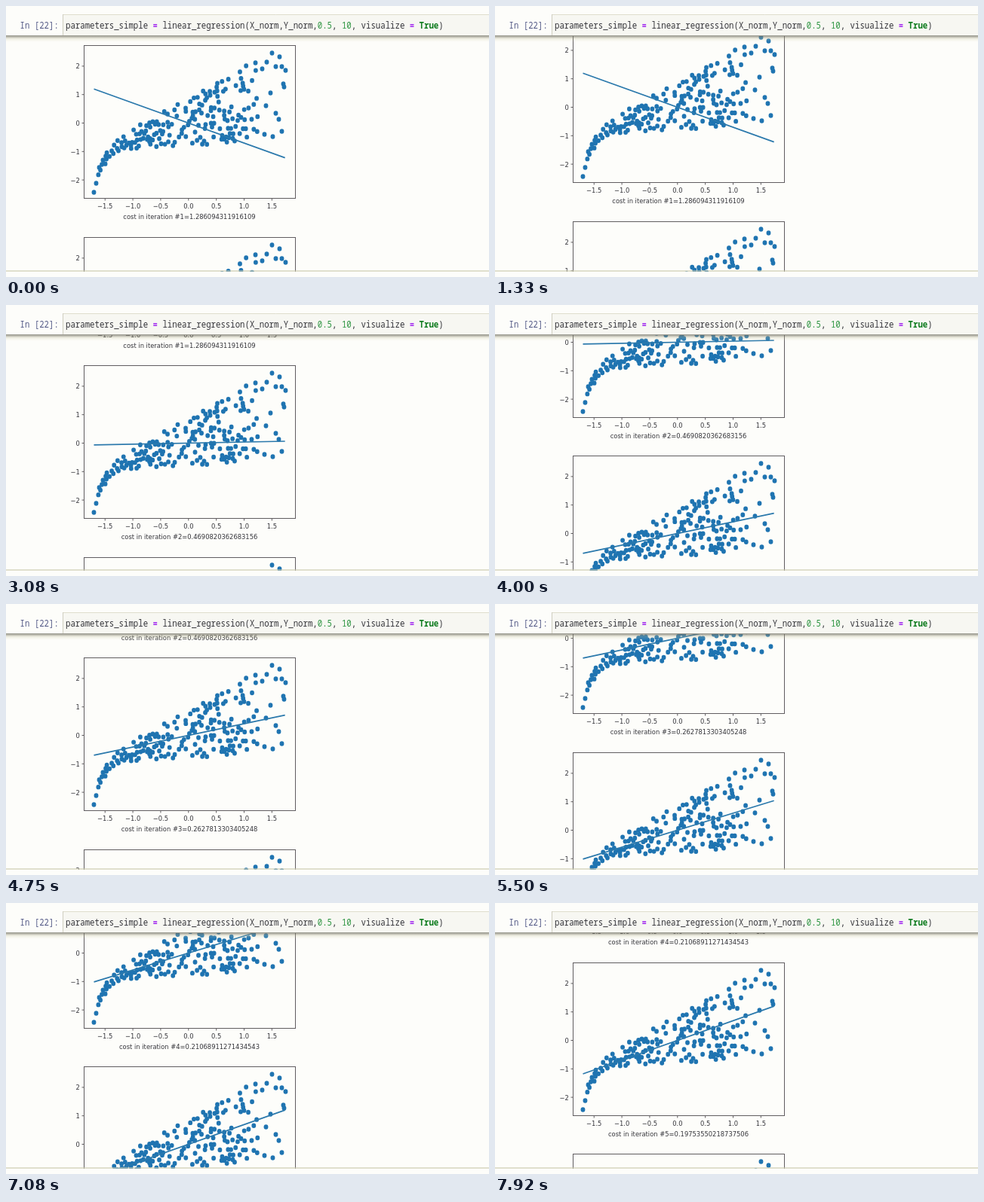
These frames come from a looping animation (640 px wide and 360 px high, 8000 ms). An HTML page with a canvas:

```html
<!DOCTYPE html>
<html lang="en">
<head>
<meta charset="utf-8">
<title>Linear regression notebook</title>
<style>
  html, body { margin: 0; width: 100%; height: 100%; overflow: hidden; background: #fdfdfa; }
  canvas { display: block; width: 640px; height: 360px; }
</style>
</head>
<body>
<canvas id="stage" width="640" height="360"></canvas>
<script>
const ctx = document.getElementById('stage').getContext('2d');
const LOOP = 8000, FRAMES = 96;
const PAPER = '#fdfdfa', INK = '#34343a', AXIS = '#605d60', BLUE = '#1f74b1';

const ASPECT_X = 0.836, ASPECT_Y = 0.934;

// Plot geometry, relative to the top left corner of the axes
const LEFT = 103.5, WIDTH = 280, HEIGHT = 203, PITCH = 254.5, FIRST_TOP = 52.5;
const ORIGIN = { x: 138.3, y: 103 }, UNIT = { x: 73.7, y: 37.8 };

const COSTS = ['1.286094311916109', '0.4690820362683156', '0.2627813303405248',
  '0.21068911271434543', '0.19753550218737506', '0.19421413056127482'];

// Time in ms and scroll offset in px
const SCROLL = [[1150, 0], [2083, 105], [3083, 226], [4000, 361],
  [5500, 619], [6333, 727.5], [7917, 991.5]];

// The sparse ends of the cloud; the rest is scattered between two curves
const END_POINTS = [
  [13, 195], [16, 183], [249, 10], [259, 15], [254, 28], [262, 28], [242, 22], [236, 31],
  [267, 33], [264, 51], [265, 55], [247, 63], [241, 80], [254, 90], [258, 98], [262, 114],
  [250, 121], [239, 118]
];
const SCATTERED = 180, MIN_GAP = 3.5;
const upperEdge = x => 146 - 0.56 * x + 40 * Math.exp((13 - x) / 15);
const lowerEdge = x => 141 - 0.06 * x + 55 * Math.exp((13 - x) / 14);

function randomSource(seed) {
  return () => (seed = (seed * 16807) % 2147483647) / 2147483647;
}

function makePoints() {
  const random = randomSource(4217);
  const points = [...END_POINTS];
  while (points.length < END_POINTS.length + SCATTERED) {
    const x = 18 + 214 * random() ** 1.2;
    const y = upperEdge(x) + (lowerEdge(x) - upperEdge(x)) * random();
    if (points.every(([px, py]) => Math.hypot(px - x, py - y) > MIN_GAP)) points.push([x, y]);
  }
  return points;
}
const POINTS = makePoints();

function scrollAt(time) {
  let i = 1;
  while (i < SCROLL.length - 1 && time > SCROLL[i][0]) i++;
  const [t0, s0] = SCROLL[i - 1], [t1, s1] = SCROLL[i];
  return Math.max(0, s0 + (s1 - s0) * (time - t0) / (t1 - t0));
}

// Draws text in the recording's aspect and returns its width on the stage
function label(text, x, y, font, align = 'left', color = INK) {
  ctx.save();
  ctx.translate(x, y);
  ctx.scale(ASPECT_X, ASPECT_Y);
  ctx.font = font;
  ctx.textAlign = align;
  ctx.fillStyle = color;
  ctx.fillText(text, 0, 0);
  const width = ctx.measureText(text).width * ASPECT_X;
  ctx.restore();
  return width;
}

function line(x0, y0, x1, y1, color, width = 1) {
  ctx.strokeStyle = color;
  ctx.lineWidth = width;
  ctx.beginPath();
  ctx.moveTo(x0, y0);
  ctx.lineTo(x1, y1);
  ctx.stroke();
}

function drawPlot(index, top) {
  const font = '10px "DejaVu Sans", sans-serif';
  const number = value => String(value).replace('-', '\u2212');
  ctx.save();
  ctx.translate(LEFT, Math.floor(top) + 0.5);

  ctx.fillStyle = BLUE;
  for (const [x, y] of POINTS) {
    ctx.beginPath();
    ctx.ellipse(x, y, 2.9, 3.2, 0, 0, 2 * Math.PI);
    ctx.fill();
  }

  // Each gradient step about halves the distance to the best slope
  const slope = 0.787 - 1.49 * 0.5025 ** index;
  const at = x => [ORIGIN.x + x * UNIT.x, ORIGIN.y - slope * x * UNIT.y];
  line(...at(-1.7), ...at(1.735), '#2b79ac', 1.7);

  ctx.strokeStyle = AXIS;
  ctx.lineWidth = 1;
  ctx.strokeRect(0, 0, WIDTH, HEIGHT);
  for (let v = -1.5; v <= 1.5; v += 0.5) {
    const x = ORIGIN.x + v * UNIT.x;
    line(x, HEIGHT, x, HEIGHT + 3, AXIS);
    label(number(v.toFixed(1)), x, 216.5, font, 'center');
  }
  for (let v = -2; v <= 2; v++) {
    const y = ORIGIN.y - v * UNIT.y;
    line(-3, y, 0, y, AXIS);
    label(number(v), -5.7, y + 3.5, font, 'right');
  }
  label(`cost in iteration #${index + 1}=${COSTS[index]}`, WIDTH / 2 - 0.5, 230, font, 'center');
  ctx.restore();
}

function drawHeader() {
  ctx.fillStyle = PAPER;
  ctx.fillRect(0, 0, 640, 40);
  ctx.fillStyle = '#f7f7f2';
  ctx.fillRect(75, 11, 565, 28);
  line(75, 11.5, 640, 11.5, '#deddcd');
  line(75.5, 11, 75.5, 39, '#cfcec0');

  const shadow = ctx.createLinearGradient(0, 39, 0, 48);
  shadow.addColorStop(0, 'rgba(100, 99, 88, 0.7)');
  shadow.addColorStop(0.25, 'rgba(130, 128, 108, 0.5)');
  shadow.addColorStop(0.5, 'rgba(190, 187, 150, 0.25)');
  shadow.addColorStop(1, 'rgba(235, 232, 200, 0)');
  ctx.fillStyle = shadow;
  ctx.fillRect(0, 39, 640, 9);

  const mono = '12.8px "Noto Sans Mono", monospace', bold = 'bold ' + mono;
  const green = '#2c9440', purple = '#a32bf0';
  label('In [22]:', 18.5, 30, mono, 'left', '#555b88');
  const code = [
    ['parameters_simple ', INK, mono], ['=', purple, bold],
    [' linear_regression(X_norm,Y_norm,', INK, mono], ['0.5', green, mono],
    [', ', INK, mono], ['10', green, mono], [', visualize ', INK, mono],
    ['=', purple, bold], [' ', INK, mono], ['True', '#0b7a1c', bold], [')', INK, mono]
  ];
  let x = 79;
  for (const [text, color, font] of code) x += label(text, x, 30, font, 'left', color);
}

function drawFooter() {
  ctx.fillStyle = PAPER;
  ctx.fillRect(0, 353, 640, 7);
  ctx.fillStyle = 'rgba(205, 203, 175, 0.6)';
  ctx.fillRect(0, 351, 640, 2);
}

function draw(time) {
  ctx.fillStyle = PAPER;
  ctx.fillRect(0, 0, 640, 360);
  const scroll = scrollAt(time);
  COSTS.forEach((_, index) => {
    const top = FIRST_TOP + index * PITCH - scroll;
    if (top > -PITCH && top < 360) drawPlot(index, top);
  });
  drawHeader();
  drawFooter();
}

const start = performance.now();
function tick() {
  const elapsed = Math.max(0, performance.now() - start) % LOOP;
  const step = LOOP / FRAMES;
  draw(Math.floor((elapsed + 4) / step) % FRAMES * step);
  requestAnimationFrame(tick);
}
tick();
</script>
</body>
</html>
```
